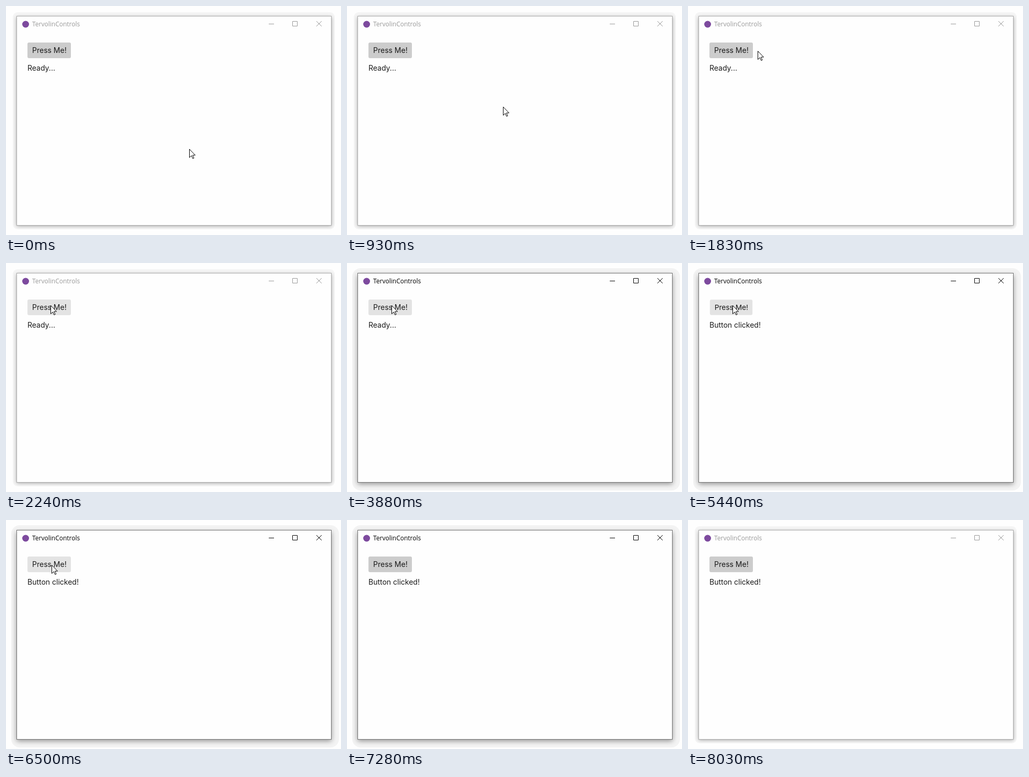
Write an HTML page that moves like this. It is 640 by 439 pixels and loops after 8.05 s.

```html
<!DOCTYPE html>
<html lang="en">
<head>
<meta charset="utf-8">
<title>Button demo</title>
<style>
html, body { margin: 0; width: 100%; height: 100%; overflow: hidden; background: #fefefe; }
svg { display: block; width: 100%; height: 100%; }
text { font: 14px Inter, sans-serif; fill: #1b1b1b; }
#title { font: 12px "Open Sans", "Noto Sans", sans-serif; fill: var(--ink); }
#controls { fill: none; stroke: var(--ink); }
#frame { fill: #fefefe; stroke: var(--edge); }
svg { --ink: #999; --edge: #aaa; }
svg.active { --ink: #000; --edge: #707070; }
.focus, .active .blur { display: none; }
.active .focus { display: inline; }
</style>
</head>
<body>
<svg id="stage" viewBox="0 0 640 439">
  <defs>
    <filter id="soft" x="-10%" y="-10%" width="120%" height="120%"><feGaussianBlur stdDeviation="3"/></filter>
    <filter id="wide" x="-10%" y="-10%" width="120%" height="120%"><feGaussianBlur stdDeviation="5"/></filter>
  </defs>
  <g class="blur">
    <rect x="13" y="12" width="615" height="416" rx="9" fill="#f5f5f5"/>
    <rect x="20" y="21" width="602" height="401" rx="3" opacity=".32" filter="url(#soft)"/>
  </g>
  <g class="focus">
    <rect x="10" y="10" width="626" height="426" rx="16" fill="#f3f3f3"/>
    <rect x="20" y="23" width="602" height="401" rx="3" opacity=".38" filter="url(#wide)"/>
  </g>
  <rect id="frame" x="20.5" y="19.5" width="601" height="401"/>
  <circle cx="37.5" cy="35" r="6.5" fill="#7d4a9e"/>
  <text id="title" x="50" y="39">TervolinControls</text>
  <path id="controls" d="M502 34.5h10M547.5 29.5h9v9h-9zM593 29l10 10m0-10l-10 10"/>
  <g id="button">
    <rect id="face" x="41" y="70" width="83" height="30" rx="3"/>
    <text x="50" y="90">Press Me!</text>
  </g>
  <text id="status" x="41" y="124"></text>
  <path id="cursor" d="M.5 .5V16.5L4.3 12.9 6.8 18.5 9 17.6 6.6 12H11.5Z" fill="#fff" stroke="#000"/>
</svg>
<script>
const LOOP = 8050;
const [stage, button, face, status_, cursor] =
  ["stage", "button", "face", "status", "cursor"].map(id => document.getElementById(id));

const easeIn = power => p => p ** power;
const easeOut = power => p => 1 - (1 - p) ** power;

const moves = [
  { start: 630, end: 1430, steps: 14, to: [178, 111], x: easeIn(1.17), y: easeOut(1.55) },
  { start: 1490, end: 2240, steps: 14, to: [85, 81], x: easeIn(.86), y: easeOut(3.3) },
  { start: 6450, end: 6500, steps: 2, to: [87, 86], x: easeIn(1), y: easeIn(1) },
  { start: 6940, end: 7223, steps: 6, to: [508, 418], x: easeIn(1.5), y: easeIn(1.5) },
];

function cursorAt(t) {
  let pos = [350, 274];
  for (const m of moves) {
    if (t < m.start) break;
    const step = Math.floor((t - m.start) / (m.end - m.start) * (m.steps - 1) + .01) + 1;
    const p = Math.min(1, step / m.steps);
    pos = [m.x(p), m.y(p)].map((e, i) => Math.round(pos[i] + (m.to[i] - pos[i]) * e));
  }
  return pos;
}

function buttonScale(t) {
  if (t < 3940 || t >= 5550) return 1;
  if (t < 4000 || t >= 5490) return .99;
  return .98;
}

function draw(t) {
  const [x, y] = cursorAt(t);
  const hover = x >= 41 && x < 124 && y >= 70 && y < 100;
  const pressed = t >= 3940 && t < 5440;
  stage.classList.toggle("active", t >= 3880 && t < 8030);
  cursor.setAttribute("transform", `translate(${x} ${y})`);
  cursor.style.display = t < 7280 ? "" : "none";
  face.setAttribute("fill", pressed ? "#999" : hover ? "#e3e3e3" : "#ccc");
  button.setAttribute("transform", `translate(82.5 85) scale(${buttonScale(t)}) translate(-82.5 -85)`);
  status_.textContent = t < 5440 ? "Ready..." : "Button clicked!";
}

function tick() {
  draw(performance.now() % LOOP);
  requestAnimationFrame(tick);
}
tick();
</script>
</body>
</html>
```
